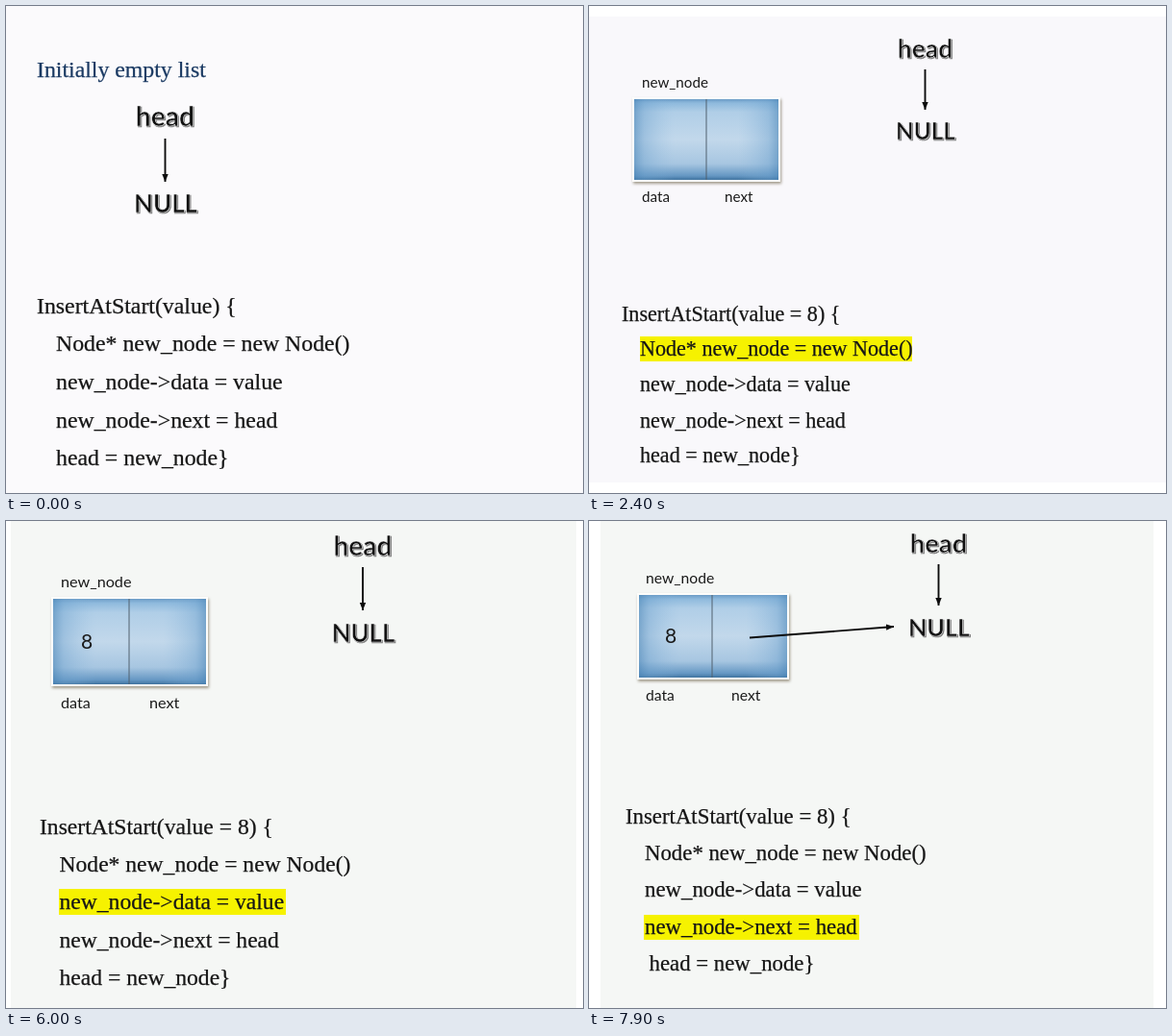
Recreate the animation shown at these times as an HTML page. Size 600 by 507 pixels, loop 8 s.

```html
<!DOCTYPE html>
<html lang="en">
<head>
<meta charset="utf-8">
<title>Inserting at the start of a linked list</title>
<style>
  html, body { margin: 0; width: 100%; height: 100%; overflow: hidden; background: #fff; }
  svg { display: block; width: 600px; height: 507px; }
  .code { font-family: "Liberation Serif", "Times New Roman", serif; fill: #161616; stroke: #161616; stroke-width: .25px; }
  .title { fill: #1b3a63; stroke: #1b3a63; }
  .label, .word { font-family: Lato, "Open Sans", sans-serif; fill: #1a1a1a; }
  .word {
    font-weight: 700; text-anchor: middle; fill: #111; stroke: #f0f0f0; stroke-width: .6px;
    filter: drop-shadow(1.5px 1.4px .2px #777);
  }
  .digit { text-anchor: middle; }
  .frame { fill: #fdfdfb; filter: drop-shadow(1.5px 2px 1.5px rgba(115, 105, 80, .65)); }
  .arrow { stroke: #0c0c0c; stroke-width: 1.9px; }
  .mark { fill: #f6f200; }
</style>
</head>
<body>
<svg id="stage" viewBox="0 0 600 507">
  <defs>
    <linearGradient id="body" x1="0" y1="0" x2="0" y2="1">
      <stop offset="0" stop-color="#6c9cc6"/>
      <stop offset=".05" stop-color="#8fbadd"/>
      <stop offset=".16" stop-color="#b0cee7"/>
      <stop offset=".5" stop-color="#c2d8eb"/>
      <stop offset=".8" stop-color="#a7c6e1"/>
      <stop offset=".95" stop-color="#6597c3"/>
      <stop offset="1" stop-color="#40739f"/>
    </linearGradient>
    <linearGradient id="sides">
      <stop offset="0" stop-color="#4b86b8" stop-opacity=".6"/>
      <stop offset=".07" stop-color="#6ba0cd" stop-opacity=".4"/>
      <stop offset=".28" stop-color="#8db9de" stop-opacity="0"/>
      <stop offset=".72" stop-color="#8db9de" stop-opacity="0"/>
      <stop offset=".93" stop-color="#6ba0cd" stop-opacity=".4"/>
      <stop offset="1" stop-color="#4b86b8" stop-opacity=".6"/>
    </linearGradient>
    <marker id="tip" viewBox="0 0 10 8" refX="10" refY="4" markerWidth="8" markerHeight="8"
            markerUnits="userSpaceOnUse" orient="auto">
      <path d="M0 0L10 4L0 8Z" fill="#0c0c0c"/>
    </marker>
  </defs>
</svg>
<script>
const LOOP = 8000;
const body = ["Node* new_node = new Node()", "new_node->data = value", "new_node->next = head", "head = new_node}"];
const call = "InsertAtStart(value = 8) {";

const scenes = [
  {
    start: 0, bg: [0, 0, 600, 507, "#fbfafc"], title: [32, 74],
    head: [165.5, 125, 215, 28.2], link: [165.5, 138, 183],
    call: "InsertAtStart(value) {", size: 23.8, x: 32, indent: 20, lines: [320, 359, 399, 439, 478]
  },
  {
    start: 2400, bg: [0, 11, 600, 485, "#f9f8fb"],
    head: [349.5, 54, 139, 26.4], link: [349.5, 66, 108],
    node: { box: [47, 97, 150, 84], split: 122, size: 15.2, name: [55, 84.5], data: [55, 203.5], next: 141 },
    call, size: 22.1, x: 34, indent: 19, lines: [328, 364, 401, 439, 475], mark: [53, 344, 283, 26]
  },
  {
    start: 5000, bg: [5, 0, 588, 507, "#f5f7f5"],
    head: [371, 36, 126, 28], link: [371, 48, 93],
    node: { box: [49, 81, 159, 89], split: 128, size: 16.2, name: [57, 68.5], data: [57, 194.5], next: 149, value: [84, 132.5] },
    call, size: 23.6, x: 35, indent: 20.5, lines: [326, 365, 404, 444, 483], mark: [55, 383, 236, 27]
  },
  {
    start: 7500, bg: [12, 0, 575, 507, "#f5f7f5"],
    head: [363.5, 33, 120, 27.3], link: [363.5, 45, 88],
    node: { box: [52, 77, 154, 86], split: 128, size: 15.7, name: [59, 65], data: [59, 187], next: 148, value: [85, 127] },
    pointer: [167, 121.5, 317, 110],
    call, size: 22.8, x: 38, indent: 20, lines: [315, 353, 391, 430, 468], lastShift: 4.5, mark: [57, 410, 224, 26]
  }
];

const text = (cls, x, y, size, str) =>
  `<text class="${cls}" x="${x}" y="${y}" font-size="${size}">${str.replace(/>/g, "&gt;")}</text>`;
const rect = ([x, y, w, h], attrs) => `<rect x="${x}" y="${y}" width="${w}" height="${h}" ${attrs}/>`;
const arrow = (x1, y1, x2, y2) =>
  `<line class="arrow" x1="${x1}" y1="${y1}" x2="${x2}" y2="${y2}" marker-end="url(#tip)"/>`;

function drawNode({ box, split, size, name, data, next, value }) {
  const [x, y, w, h] = box;
  return rect([x - 2, y - 2, w + 4, h + 4], 'class="frame"') +
    rect(box, 'fill="url(#body)"') +
    rect(box, 'fill="url(#sides)"') +
    `<path d="M${split} ${y}v${h}" stroke="#50606e" stroke-width="1"/>` +
    text("label", ...name, size, "new_node") +
    text("label", ...data, size, "data") +
    text("label", next, data[1], size, "next") +
    (value ? text("label digit", ...value, 21, "8") : "");
}

function drawScene(s) {
  const [hx, headY, nullY, wordSize] = s.head;
  const [lx, top, bottom] = s.link;
  let out = rect(s.bg, `fill="${s.bg[4]}"`);
  if (s.title) out += text("code title", ...s.title, s.size, "Initially empty list");
  out += text("word", hx, headY, wordSize, "head") +
    arrow(lx, top, lx, bottom) +
    text("word", hx + .5, nullY, wordSize * .92, "NULL");
  if (s.node) out += drawNode(s.node);
  if (s.pointer) out += arrow(...s.pointer);
  if (s.mark) out += rect(s.mark, 'class="mark"');
  out += text("code", s.x, s.lines[0], s.size, s.call);
  body.forEach((line, i) => {
    const shift = i === 3 ? s.lastShift || 0 : 0;
    out += text("code", s.x + s.indent + shift, s.lines[i + 1], s.size, line);
  });
  return out;
}

const stage = document.getElementById("stage");
const groups = scenes.map(s => {
  const g = document.createElementNS("http://www.w3.org/2000/svg", "g");
  g.innerHTML = drawScene(s);
  stage.append(g);
  return g;
});

function tick() {
  const t = performance.now() % LOOP;
  const current = scenes.filter(s => s.start <= t).length - 1;
  groups.forEach((g, i) => { g.style.display = i === current ? "" : "none"; });
  requestAnimationFrame(tick);
}
tick();
</script>
</body>
</html>
```
